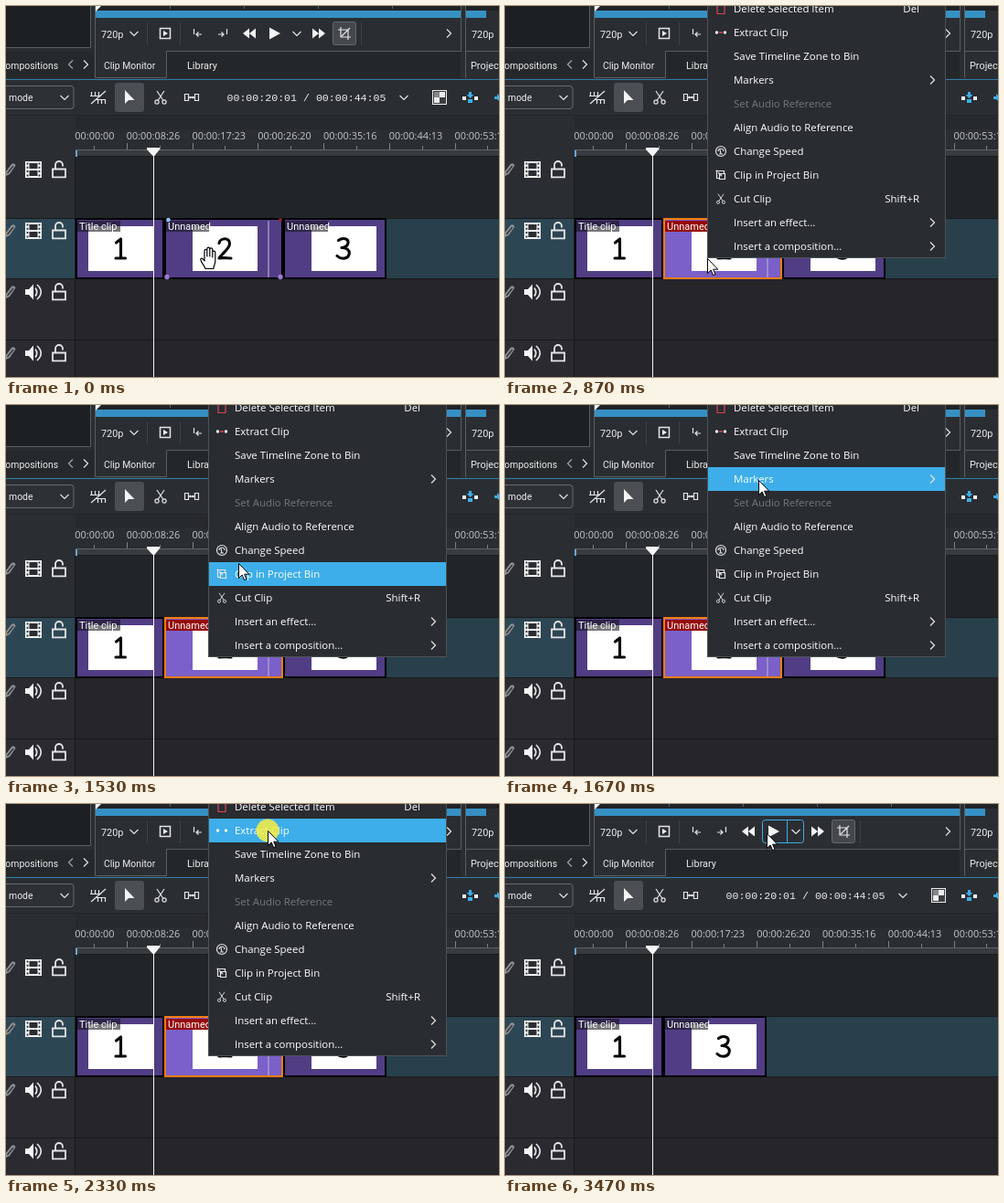
These frames come from a looping animation (539x406 px, 4.07 s). An HTML page:

```html
<!DOCTYPE html>
<html lang="en">
<head>
<meta charset="utf-8">
<title>Extract clip</title>
<style>
html, body { margin: 0; width: 100%; height: 100%; overflow: hidden; background: #2a2e32; }
svg { display: block; width: 539px; height: 406px; }
text { font: 10.9px Roboto, "Open Sans", sans-serif; fill: #eceded; white-space: pre; }
.menu text { font: 11.45px "Open Sans", "Noto Sans", sans-serif; fill: #fff; }
.menu .off { fill: #75797c; }
.ruler text { font: 10.9px "Open Sans", "Noto Sans", sans-serif; fill: #c6c8ca; }
.tight { font-size: 10.4px; }
.code { font: 11.6px "Liberation Mono", "Courier New", monospace; fill: #eceded; }
.label { font-size: 11px; fill: #fff; }
.line { fill: none; stroke: #e4e5e6; stroke-width: 1.2; }
.frame { fill: none; stroke: #5a5e62; }
.faint { fill: none; stroke: #3c4044; }
</style>
</head>
<body>
<svg id="stage" viewBox="0 0 539 406" xmlns="http://www.w3.org/2000/svg"></svg>
<script>
const LOOP = 4070;

const rect = (x, y, w, h, fill, more = '') =>
  `<rect x="${x}" y="${y}" width="${w}" height="${h}" fill="${fill}" ${more}/>`;
const text = (x, y, s, more = '') => `<text x="${x}" y="${y}" ${more}>${s}</text>`;
const path = (d, name) => `<path class="${name}" d="${d}"/>`;
const line = (d, more = '') => `<path class="line" d="${d}" ${more}/>`;
const solid = (d, fill = '#f4f5f5') => `<path d="${d}" fill="${fill}"/>`;
const dot = (x, y, r, fill) => `<circle cx="${x}" cy="${y}" r="${r}" fill="${fill}"/>`;
const at = (x, y, body) => `<g transform="translate(${x} ${y})">${body}</g>`;
const chevDown = (x, y) => line(`M${x - 4.5} ${y - 2}l4.5 4.5l4.5 -4.5`);
const chevRight = (x, y) => line(`M${x - 2} ${y - 4.5}l4.5 4.5l-4.5 4.5`);
const chevLeft = (x, y) => line(`M${x + 1} ${y - 4.5}l-4.5 4.5l4.5 4.5`, 'opacity=".65"');
const range = n => [...Array(n).keys()];

const scissors = line('M-4 -7L3 3.5M4 -7L-3 3.5') +
  '<circle class="line" cx="-4" cy="5" r="2.1"/><circle class="line" cx="4" cy="5" r="2.1"/>';
const crop = line('M-4 -7V4H7M-7 -4H4V7M-3 3L6 -6');

function monitor() {
  const ticks = range(5).map(i => `M${98.5 + i * 81} 0v${i ? 3 : 5}`).join('');
  return rect(0, 0, 539, 81, '#2a2e32') +
    rect(0, 0, 92, 45, '#1d2023') + path('M0 45.5H92.5V0', 'frame') +
    rect(98, 0, 400, 5, '#202326') + rect(503, 0, 36, 5, '#202326') +
    rect(98, 5, 400, 8, '#3690c4') + rect(503, 5, 22, 8, '#3690c4') +
    path(ticks, 'frame') + solid('M98 0h6l-6 6z') +
    rect(176, 50, 321, 29, '#23272a') + rect(0, 50, 96, 29, '#25292c') +
    path('M97.5 0V78.5H175.5V49.5H497.5V0M502.5 0V49.5H539M502.5 49V79', 'frame') +
    text(104, 34.5, '720p') + chevDown(140, 30) +
    path('M154.5 18v25M190.5 18v25M388.5 18v25', 'faint') +
    line('M168.5 24.5h11v11h-11z', 'style="stroke-width:1.5"') + solid('M172 27l5 3l-5 3z') +
    line('M205.5 25v6M214 31h-6M210.5 28.5l-2.5 2.5l2.5 2.5') +
    line('M241.5 25v6M232 31h6M235.5 28.5l2.500 2.5l-2.5 2.5') +
    solid('M266 24.5v11l-7 -5.5zM273 24.5v11l-7 -5.5z') +
    rect(281.5, 17.5, 45, 25, 'none', 'id="hover" rx="3" stroke="#3daee9"') +
    line('M308.5 18v24', 'id="split" style="stroke:#3daee9;stroke-width:1"') +
    solid('M288 23.5v13l12 -6.5z') + chevDown(318, 30) +
    solid('M335 24.5v11l7 -5.5zM342 24.5v11l7 -5.5z') +
    rect(357.5, 17.5, 25, 25, '#44484c', 'rx="2" stroke="#656a6e"') + at(370, 30, crop) +
    chevRight(484, 30) + text(509, 34.5, '720p') +
    text(57, 69, 'Compositions', 'class="tight" text-anchor="end"') + chevLeft(72, 64) + chevRight(87, 64) +
    text(107, 69, 'Clip Monitor', 'class="tight"') + text(198, 69, 'Library') + text(508, 69, 'Project') +
    rect(0, 80, 539, 1, '#2f7dab');
}

function toolbar() {
  return rect(0, 81, 539, 39, '#2a2e32') +
    rect(-5, 87.5, 79, 25, '#2d3135', 'rx="3" stroke="#666b70"') +
    text(29.5, 104, 'Normal mode', 'class="tight" text-anchor="end"') + chevDown(64, 100) +
    line('M93.5 94v4M97.5 94v4M101.5 94v4M92 98.500h12M98 102.5h11M100.500 103v4M104.5 103v4M108.5 103v4M93 107L109 93') +
    rect(119, 84, 32, 32, '#4b4f53', 'rx="3"') + solid('M130 92v15l4 -4h6.5z') +
    at(169, 100, scissors) +
    line('M195.5 96.5h4v7h-4zM206.5 96.5h4v7h-4zM200.5 100h5') +
    dot(201.5, 100, 1.2, '#fff') + dot(204.5, 100, 1.2, '#fff') +
    text(241.5, 104, '00:00:20:01 / 00:00:44:05', 'class="code"') + chevDown(435, 100) +
    rect(466.5, 92.5, 15, 15, '#3a3e41', 'stroke="#eceded"') +
    rect(468, 94, 6, 6, '#85888a') + rect(474, 94, 6, 6, '#eceded') + rect(468, 100, 6, 6, '#eceded') +
    solid('M506 94h3v3h2.5l-4 4l-4 -4h2.5z', '#3daee9') +
    rect(499, 99, 4, 4, '#f4f5f5') + rect(505, 102, 5, 4, '#3daee9') + rect(512, 99, 4, 4, '#f4f5f5') +
    solid('M534 99h3v-3l2 2v6l-2 -2h-3z', '#3daee9');
}

const film = rect(21, -9, 18, 18, '#f4f5f5') +
  rect(25.5, -7, 9, 6, '#2a2e32') + rect(25.5, 1, 9, 6, '#2a2e32') +
  line('M23.5 -7.5v15M36.5 -7.5v15', 'style="stroke:#2a2e32;stroke-width:1.8;stroke-dasharray:2 2.3"');
const lock = line('M51 -.5h14v8.8h-14zM54 -.5v-4.500a4 4 0 0 1 8 0v1.5', 'style="stroke-width:1.8"');
const pencil = solid('M0 2L6 -6q3 -2 4.500 1.5L4 5L0 7z', '#8d9194') + line('M1.5 4L8 -4', 'style="stroke:#2a2e32"');
const speaker = solid('M21 -3h4l5 -5.5v17l-5 -5.5h-4z') +
  line('M32 -4.5q3.5 4.5 0 9M34 -8q8.500 8 0 16', 'style="stroke-width:1.7"');

function tracks() {
  const rows = [
    [165, 67, '#2a2d31', '#222528', 179, film],
    [233, 65, '#2d4654', '#27404b', 246, film],
    [299, 66, '#2a2a30', '#25252a', 313, speaker],
    [366, 40, '#2a2a30', '#25252a', 380, speaker]
  ];
  return rect(0, 119, 539, 287, '#191b1d') + rows.map(([y, h, head, lane, mid, icon]) =>
    rect(0, y, 75, h, head) + rect(76, y, 463, h, lane) + at(0, mid, pencil + icon + lock)).join('');
}

function ruler() {
  const labels = ['00:00:00:00', '00:00:08:26', '00:00:17:23', '00:00:26:20', '00:00:35:16', '00:00:44:13', '00:00:53:10'];
  const step = 71.75, x0 = 60;
  const ticks = range(14).map(i => `M${Math.round(x0 + i * step / 2) + .5} ${i % 2 ? 153 : 150}V157`).join('');
  return rect(0, 119, 539, 46, '#2a2e32') + rect(76, 119, 463, 16, '#26292d') + rect(0, 119, 539, 1, '#222529') +
    '<clipPath id="view"><rect x="75" y="119" width="464" height="50"/></clipPath>' +
    `<g class="ruler" clip-path="url(#view)">${labels.map((s, i) => text(x0 + i * step, 146, s)).join('')}` +
    line(ticks, 'style="stroke:#7d8184;stroke-width:1"') +
    rect(76, 157, 463, 7, '#383c40') + rect(76, 157, 463, 1, '#5f6366') +
    rect(76, 164, 463, 1, '#191b1d') + rect(76, 158, 2, 7, '#6aa6dc') + '</g>';
}

const digits = {
  1: 'M-4.5 -6.5L.5 -10.5V10.5M-5 10.5H5.5',
  2: 'M-6 -6C-5 -12 6 -13 5.5 -5C5 1 -3 5 -6 10.5C-2 9.5 3 10.5 7 10.5',
  3: 'M-5.5 -9C-1 -12.5 6 -11 5 -6C4.5 -2.5 0 -1 -2 -1C3 -1.5 7.5 2 6 6.5C4.5 11.5 -3 12 -7 8'
};

function clip(x, w, thumb, name, n, picked) {
  const edge = picked ? '#f67c0c' : '#000';
  return rect(x, 232, w, 67, '#000') +
    rect(x + 1, 233, w - 2, 65, picked ? '#7a60c8' : '#513d84', `stroke="${edge}" stroke-width="2"`) +
    rect(thumb, 241, 71, 49, '#fff') +
    at(thumb + 35, 265.5, `<path d="${digits[n]}" fill="none" stroke="#080808" stroke-width="3.1" stroke-linecap="round" stroke-linejoin="round"/>`) +
    rect(x + 2, 235, 47, 12, picked ? '#960808' : '#14141c', picked ? '' : 'opacity=".58"') +
    text(x + 4, 245, name, 'class="label"');
}

const trimLine = rect(286, 235, 2, 62, '#b4a8dc', 'opacity=".6"');
function clips() {
  return clip(76, 97, 90, 'Title clip', 1) +
    `<g id="idle">${clip(173, 130, 204, 'Unnamed', 2)}${trimLine}` +
    dot(177.5, 234, 2.3, '#8cc6ee') + dot(300, 234, 2, '#8e2027') +
    dot(176, 296.5, 2.7, '#9a7cd0') + dot(300, 296.5, 2.7, '#9a7cd0') + '</g>' +
    `<g id="picked">${clip(173, 130, 204, 'Unnamed', 2, true)}${trimLine}</g>` +
    `<g id="third">${clip(303, 113, 334, 'Unnamed', 3)}</g>`;
}

const playhead = rect(161, 160, 1, 246, '#f4f5f5') + solid('M154 155h14v2l-6.5 8l-7.5 -8z');

function menu() {
  const items = [
    ['Delete Selected Item', 'Del'], ['Extract Clip'], ['Save Timeline Zone to Bin'], ['Markers', '>'],
    ['Set Audio Reference'], ['Align Audio to Reference'], ['Change Speed'], ['Clip in Project Bin'],
    ['Cut Clip', 'Shift+R'], ['Insert an effect...', '>'], ['Insert a composition...', '>']
  ];
  const icons = {
    0: line('M-6 -4h12M-4 -4v9.5h8v-9.5M-2 -4v-2h4v2', 'style="stroke:#da4453"'),
    1: dot(-4.5, 0, 1.7, '#fff') + dot(4.5, 0, 1.7, '#fff') +
       '<path id="dash" d="M-2 0h4" stroke="#da4453" stroke-width="1.5"/>',
    6: '<circle class="line" r="5.5"/>' + line('M0 3L-1 -2M-3 0a3 3 0 0 1 6 0M-2 3h4'),
    7: line('M-5.5 -4.5h9v3M-4.5 -5.500v9h3M-1.5 -1.5h6v6h-6zM-3 -3l4 4'),
    8: `<g transform="scale(.75)">${scissors}</g>`
  };
  const rows = items.map(([name, extra], i) => {
    const y = 3 + 26 * i;
    const side = extra === '>' ? chevRight(467, y) : extra ? text(453, y + 4, extra, 'text-anchor="end"') : '';
    return text(250, y + 4, name, i === 4 ? 'class="off"' : '') + side + (icons[i] ? at(236, y, icons[i]) : '');
  }).join('');
  return `<g id="menu" class="menu">${rect(221.5, -10, 260, 285.5, '#292c30', 'stroke="#4d5256"')}` +
    rect(222, 0, 259, 26, '#3daee9', 'id="bar"') + rows + '</g>';
}

const pointers = `<circle id="click" r="12.5" fill="#fff03a" opacity=".82"/>` +
  `<path id="arrow" d="M.5 .5V16.5L4.2 13L6.6 18.6L9 17.6L6.6 12.2H11.8Z" fill="#fff" stroke="#000"/>` +
  `<path id="hand" transform="translate(212 263)" fill="#fff" stroke="#000" stroke-width="1.2" stroke-linejoin="round"
    d="M6 24.5C5 21 1 17.5 .8 14.5C.8 12.5 3 12.5 4.2 15L5 16V5C5 2.8 7.6 2.8 7.8 5V11V3C8 .6 10.6 .6 10.8 3V11V3.5C11 1.4 13.6 1.4 13.8 3.5V12V6.5C14 4.6 16.6 4.6 16.8 6.5V16C16.8 20 15 21 14.8 24.5Z"/>`;

const stage = document.getElementById('stage');
stage.innerHTML = monitor() + toolbar() + tracks() + ruler() + clips() + playhead + menu() + pointers;

// time, pointer x, pointer y, menu opacity, click ring
const steps = [
  [0, 221, 276, 0, 0],
  [670, 221, 276, .08, 1],
  [730, 221, 276, .45, 1],
  [800, 221, 276, .85, 1],
  [870, 221, 276, 1, 0],
  [1330, 223, 270, 1, 0],
  [1400, 230, 251, 1, 0],
  [1470, 241, 216, 1, 0],
  [1530, 254, 173, 1, 0],
  [1600, 267, 125, 1, 0],
  [1670, 277, 82, 1, 0],
  [1730, 283, 50, 1, 0],
  [1800, 285, 32, 1, 0],
  [1870, 286, 29, 1, 0],
  [2330, 286, 29, 1, 1],
  [2470, 286, 29, .7, 0],
  [2530, 286, 29, .3, 0],
  [2600, 286, 29, 0, 0],
  [3330, 286, 30, 0, 0],
  [3400, 286, 31, 0, 0],
  [3470, 286, 32, 0, 0]
];

const el = id => document.getElementById(id);
const show = (id, on) => el(id).setAttribute('visibility', on ? 'visible' : 'hidden');
const move = (id, x, y) => el(id).setAttribute('transform', `translate(${x} ${y})`);

function draw(t) {
  const [start, x, y, alpha, ring] = steps.findLast(s => s[0] <= t);
  const done = start >= 2600;
  const row = start >= 1330 && alpha ? Math.floor((y + 10) / 26) : -1;
  el('menu').setAttribute('opacity', alpha);
  show('bar', row >= 0);
  el('bar').setAttribute('y', row * 26 - 10);
  show('dash', row !== 1);
  show('idle', start < 730);
  show('picked', start >= 730 && !done);
  move('third', done ? -130 : 0, 0);
  show('hover', done);
  show('split', done);
  show('hand', start < 670);
  show('arrow', start >= 670);
  show('click', ring);
  move('arrow', x, y);
  move('click', x, y);
}

const begin = performance.now();
function tick() {
  draw((performance.now() - begin) % LOOP);
  requestAnimationFrame(tick);
}
tick();
</script>
</body>
</html>
```
